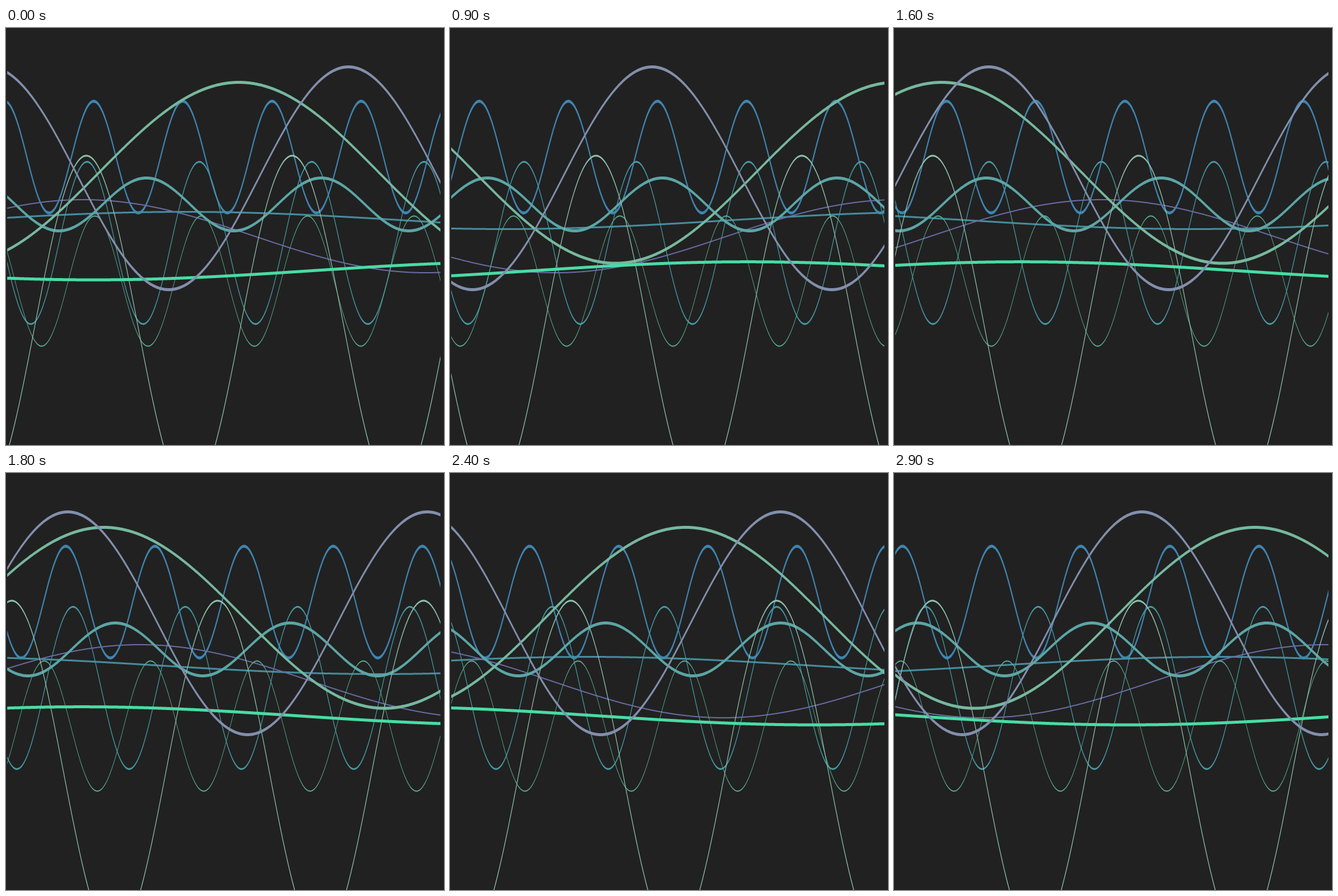
An HTML page with a canvas that plays this animation: 737 px wide and 702 px high, repeating every 3000 ms.

```html
<!DOCTYPE html>
<html lang="en">
<head>
<meta charset="utf-8">
<title>Waves</title>
<style>
  html, body { margin: 0; width: 100%; height: 100%; overflow: hidden; background: #212121; }
  canvas { display: block; }
</style>
</head>
<body>
<canvas id="stage" width="737" height="702"></canvas>
<script>
const ctx = document.getElementById('stage').getContext('2d');
const WIDTH = 737, HEIGHT = 702, LEFT = 2, RIGHT = 731;
const LOOP = 3000, STEP = 100;
const PEN_RATIO = 0.35; // the pen is narrower across than it is tall

// crest: x of a crest at the start; speed: pixels per tick
const wave = (color, width, mid, height, length, crest, speed) =>
  ({ color, width, mid, height, length, crest, speed });

const waves = [
  wave('#3f84b0', 5, 217.3, 94, 150, 147.6, 3.03),
  wave('#458c9d', 3, 324, 14.5, 1495, 300, 31.7),
  wave('#4599a4', 3, 361.8, 136.5, 189, 136.3, -11.81),
  wave('#696ba4', 2, 350.5, 61.5, 1153, 130, -31.1),
  wave('#5ca5a5', 5, 297, 44.5, 294.2, 236.3, 7.11),
  wave('#58ac90', 2, 426, 109.5, 179, 149.5, -2.51),
  wave('#76b89f', 5, 243.8, 152.3, 944, 392, 21.08),
  wave('#8fc2ad', 3, 501, 286, 346.4, 135.2, -13.88),
  wave('#48dca5', 5, 408.8, 15.2, 1458, 876, -22.03),
  wave('#828fac', 5, 253, 187.5, 604.8, 576.2, -13.89)
];

// Two ticks per step, with every tenth step only half as long.
function ticksAt(time) {
  const step = Math.floor((time % LOOP) / STEP);
  return 2 * step - Math.floor((step + 8) / 10);
}

function drawWave({ color, width, mid, height, length, crest, speed }, ticks) {
  const center = crest + speed * ticks;
  ctx.save();
  ctx.beginPath();
  for (let x = LEFT - 4; x <= RIGHT + 4; x++) {
    ctx.lineTo(x, mid - height * Math.cos((x - center) * 2 * Math.PI / length));
  }
  ctx.scale(PEN_RATIO, 1);
  ctx.strokeStyle = color;
  ctx.lineWidth = width;
  ctx.lineJoin = 'round';
  ctx.stroke();
  ctx.restore();
}

function render(time) {
  ctx.fillStyle = '#212121';
  ctx.fillRect(0, 0, WIDTH, HEIGHT);
  ctx.save();
  ctx.beginPath();
  ctx.rect(LEFT, 0, RIGHT - LEFT, HEIGHT);
  ctx.clip();
  const ticks = ticksAt(time);
  waves.forEach(w => drawWave(w, ticks));
  ctx.restore();
}

const start = performance.now();
function loop() {
  render(performance.now() - start);
  requestAnimationFrame(loop);
}
loop();
</script>
</body>
</html>
```
